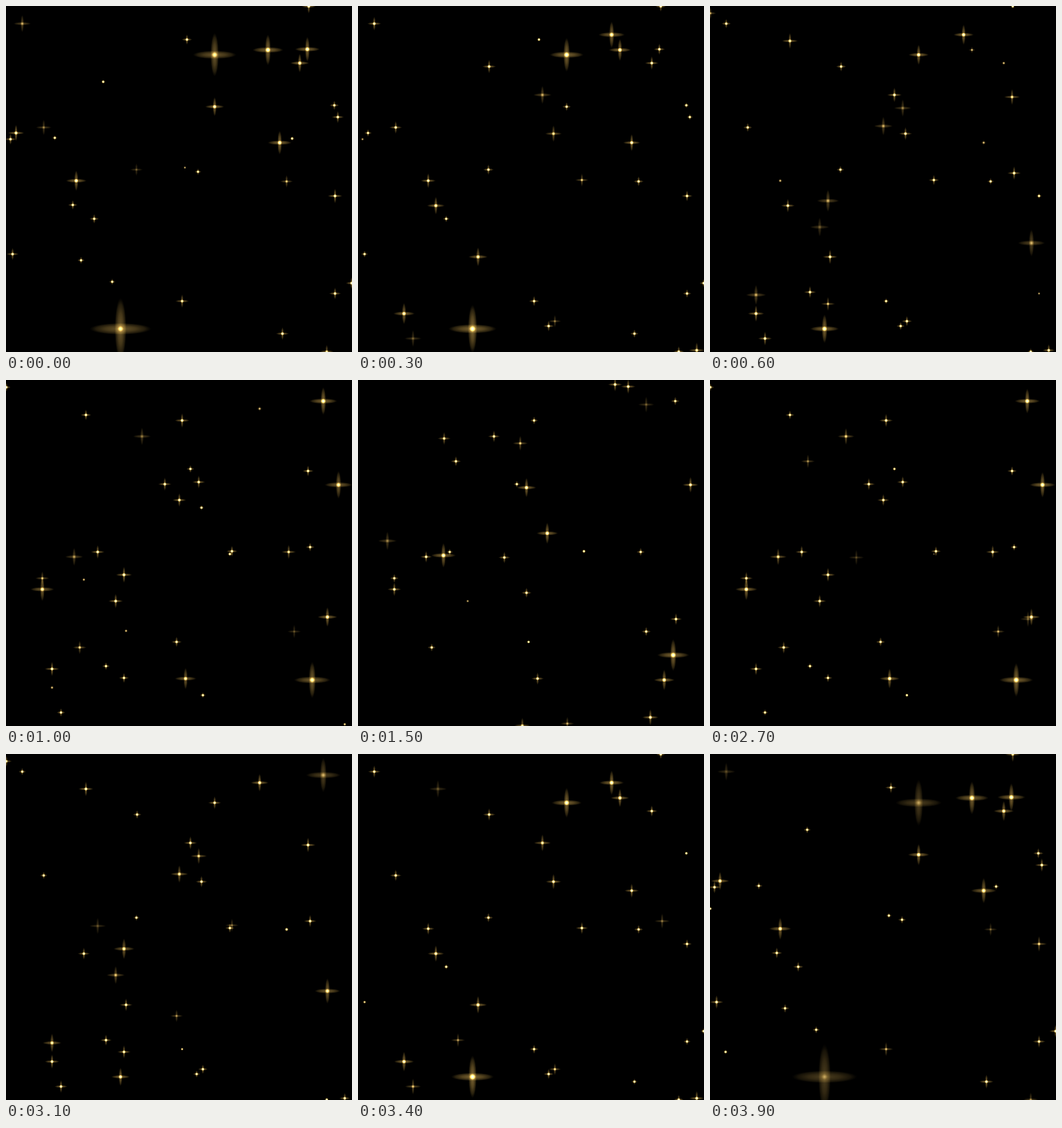
An HTML page with a canvas for the animation above (4000 ms loop, 500x500 px).

```html
<!DOCTYPE html>
<html>
<head>
<meta charset="utf-8">
<style>
  html, body { margin: 0; width: 100%; height: 100%; overflow: hidden; background: #000; }
  canvas { display: block; }
</style>
</head>
<body>
<canvas id="sky" width="500" height="500"></canvas>
<script>
const ctx = document.getElementById('sky').getContext('2d');
const STEP = 100, STEPS = 40, LIFE = 950, FADE_IN = 240, SMALL = 72;
const stars = [];

// Bright stars born together, listed from the largest to the smallest.
function burst(birth, largest, ...points) {
  points.forEach(([x, y], i) =>
    stars.push({ x, y, birth, size: 10 + (largest - 10) / (1 + i * 0.6) }));
}

burst(-470, 26, [435, 62], [301, 145], [14, 183]);
burst(-220, 25, [378, 63], [395, 197], [101, 252], [424, 82]);
burst(-80, 45, [165, 466], [301, 70]);
burst(180, 20, [366, 41], [66, 444], [173, 362], [112, 288]);
burst(600, 19, [464, 342], [170, 281], [66, 417], [250, 173]);
burst(705, 24, [458, 30]);
burst(900, 27, [442, 433], [480, 151], [52, 302], [259, 431]);
burst(1330, 25, [455, 397], [123, 253], [273, 221], [243, 155]);
burst(1680, 26, [469, 339], [369, 478], [432, 257], [471, 294]);

// Small stars are scattered and born at an even pace.
let seed = 11;
const random = () => (seed = seed * 16807 % 2147483647) / 2147483647;
for (let i = 0; i < SMALL; i++) {
  stars.push({
    x: Math.floor(random() * 500),
    y: Math.floor(random() * 500),
    birth: 2700 * i / SMALL - 900,
    size: 8 + 5 * random()
  });
}

function glow(x, y, rx, ry, stops) {
  const gradient = ctx.createRadialGradient(0, 0, 0, 0, 0, 1);
  stops.forEach(([at, color]) => gradient.addColorStop(at, color));
  ctx.save();
  ctx.translate(x, y);
  ctx.scale(rx, ry);
  ctx.fillStyle = gradient;
  ctx.fillRect(-1, -1, 2, 2);
  ctx.restore();
}

const ARM = [[0, 'rgba(150,122,62,.85)'], [.5, 'rgba(125,100,46,.65)'],
  [.8, 'rgba(100,80,34,.4)'], [1, 'rgba(70,55,20,0)']];
const CORE = [[0, '#fff4d0'], [.4, 'rgba(255,225,150,.75)'], [1, 'rgba(190,150,70,0)']];

function drawStar({ x, y, birth, size }, time) {
  const age = time - birth;
  if (age < 0 || age >= LIFE) return;
  const arm = 1.1 * size * Math.sqrt(1 - age / LIFE);
  const thick = Math.max(1.8, arm * 0.19);
  const core = Math.min(4.5, 1.8 + arm * 0.09);
  const youth = Math.min(1, age / FADE_IN);
  const alpha = Math.min(0.4 + 0.6 * youth, (LIFE - age) / 60);
  ctx.globalAlpha = alpha;
  glow(x + .5, y + .5, arm, thick, ARM);
  glow(x + .5, y + .5, thick, arm, ARM);
  ctx.globalAlpha = alpha * youth;
  glow(x + .5, y + .5, core, core, CORE);
}

// The sky plays forwards, then backwards.
function draw(now) {
  const n = (Math.floor(now / STEP) + 1) % STEPS;
  const time = STEP * Math.min(n, STEPS - n);
  ctx.globalCompositeOperation = 'source-over';
  ctx.globalAlpha = 1;
  ctx.fillStyle = '#000';
  ctx.fillRect(0, 0, 500, 500);
  ctx.globalCompositeOperation = 'lighter';
  stars.forEach(star => drawStar(star, time));
}

const start = performance.now();
(function loop() {
  draw(performance.now() - start);
  requestAnimationFrame(loop);
})();
</script>
</body>
</html>
```
